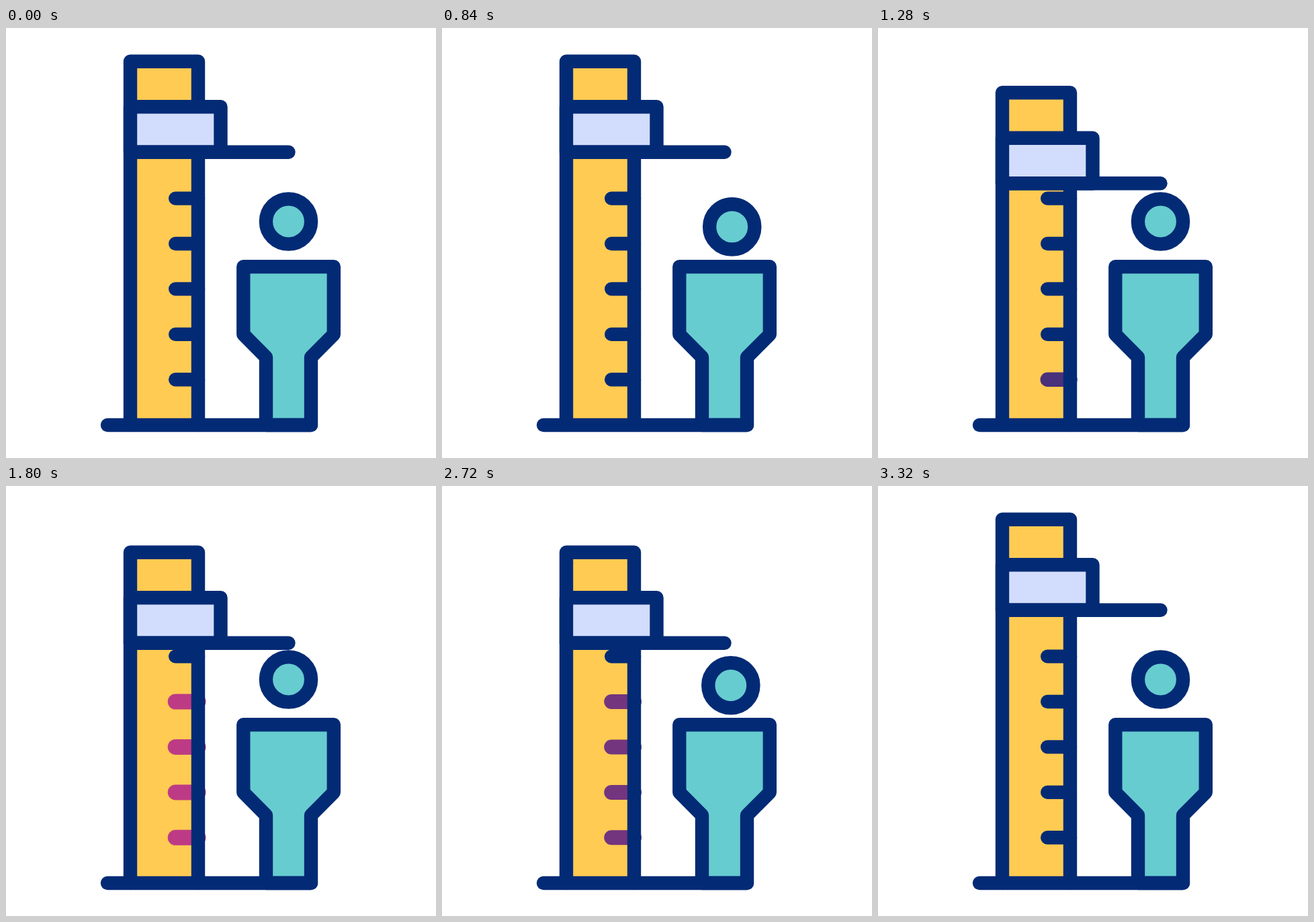
Write an HTML page that moves like this. It is 640x640 px and loops after 3640 ms.

```html
<!DOCTYPE html>
<html lang="en">
<head>
<meta charset="utf-8">
<title>Height measurement</title>
<style>
  html, body { margin: 0; width: 100%; height: 100%; overflow: hidden; background: #fff; }
  svg { display: block; width: 100%; height: 100%; }
</style>
</head>
<body>
<svg viewBox="0 0 640 640" fill="none" stroke="#032b75" stroke-width="20.4" stroke-linecap="round" stroke-linejoin="round">
  <path id="fill" fill="#ffcb52" stroke="none"/>
  <g id="ticks"></g>
  <path id="ruler"/>
  <g id="slider">
    <path d="M185 117.3H319.5V184.8H185Z" fill="#d2dcfd"/>
    <path d="M185 184.8H420.5"/>
  </g>
  <path d="M353.3 355.3H487.8V456L454 490V591H387V490L353.3 456Z" fill="#67ccd0"/>
  <path d="M151 591H454"/>
  <circle id="head" cx="420.5" cy="288" r="33.6" fill="#67ccd0"/>
</svg>
<script>
const LOOP = 3640, FRAME = 40, STEP = 400 / 3, DROP = 49;
const NAVY = [3, 43, 117], PINK = [189, 59, 132];
const $ = id => document.getElementById(id);
const ramp = (t, start, length) => Math.min(1, Math.max(0, (t - start) / length));
const smooth = x => x * x * (3 - 2 * x);
const easeOut = x => 1 - (1 - x) ** 2;
const mix = (a, b, p) => a + (b - a) * p;

// Ticks from the bottom up; the top one keeps its colour.
const ticks = [523.3, 455.9, 388.4, 321, 253.6].map(y => {
  const tick = document.createElementNS("http://www.w3.org/2000/svg", "path");
  tick.setAttribute("d", `M252.2 ${y}H286`);
  return $("ticks").appendChild(tick);
});

// Head offsets from rest, one pose per step.
const REST = [0, 0], RIGHT = [14.3, 6.5], LOW = [0, 13], LEFT = [-14.3, 6.5];
const poses = [REST, RIGHT, LOW, LEFT, LOW, REST, RIGHT, LOW, REST];

function headOffset(t) {
  const last = poses.length - 1;
  const pos = ramp(t, 0, STEP * last) * last;
  const i = Math.min(Math.floor(pos), last - 1);
  const p = smooth(pos - i);
  return poses[i].map((v, axis) => mix(v, poses[i + 1][axis], p));
}

function draw(t) {
  const [x, y] = headOffset(t < 1860 ? t : t - 1867);
  $("head").setAttribute("transform", `translate(${x} ${y})`);

  const drop = DROP * (easeOut(ramp(t, 867, 533)) - smooth(ramp(t, 2800, 485)));
  const outline = `M185 591V${49.7 + drop}H286V591`;
  $("fill").setAttribute("d", outline + "Z");
  $("ruler").setAttribute("d", outline);
  $("slider").setAttribute("transform", `translate(0 ${drop})`);

  ticks.forEach((tick, i) => {
    const p = i > 3 ? 0 : ramp(t, 1230 + i * STEP, STEP) - ramp(t, 2667, STEP);
    tick.setAttribute("stroke", `rgb(${NAVY.map((c, k) => Math.round(mix(c, PINK[k], p)))})`);
    tick.setAttribute("stroke-width", mix(20.4, 23, p));
  });
}

const began = performance.now();
function animate() {
  const t = (performance.now() - began) % LOOP;
  draw(Math.floor(t / FRAME) * FRAME);
  requestAnimationFrame(animate);
}
animate();
</script>
</body>
</html>
```
